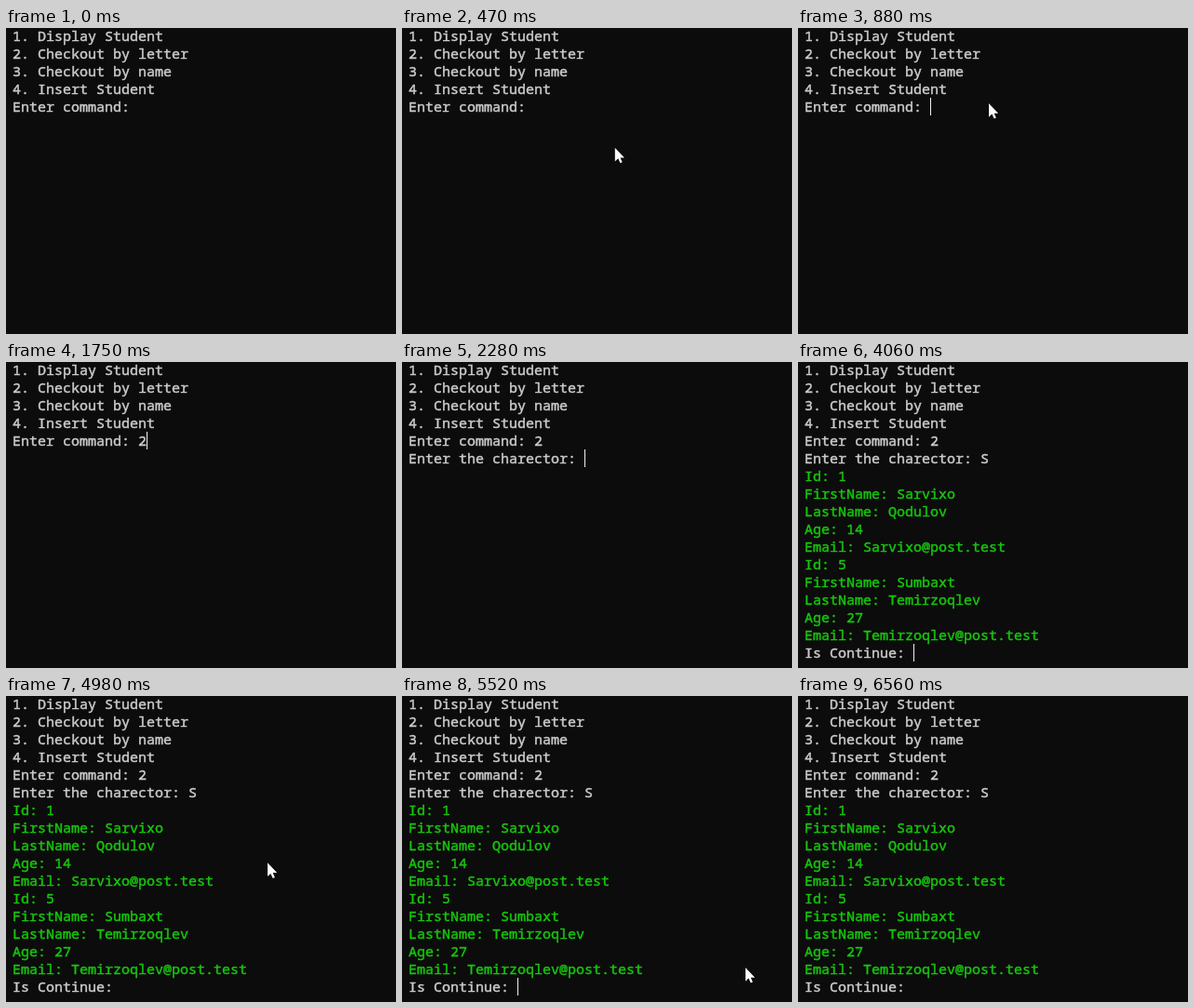
Animation of 419x329 px, one loop 6.62 s. Source, as an HTML page:

```html
<!DOCTYPE html>
<html lang="en">
<head>
<meta charset="utf-8">
<title>Student console</title>
<style>
  html, body { margin: 0; width: 100%; height: 100%; overflow: hidden; background: #0c0c0c; }
  svg { display: block; width: 419px; height: 329px; }
  text {
    font: 500 15px "Noto Sans Mono", "DejaVu Sans Mono", monospace;
    white-space: pre; fill: #ccc; stroke: #ccc; stroke-width: .45px;
  }
  .result { fill: #16c60c; stroke: #16c60c; }
</style>
</head>
<body>
<svg viewBox="0 0 419 329">
  <g id="screen"></g>
  <rect id="caret" width="1" height="19" fill="#f2f2f2"/>
  <path id="pointer" d="M0 0V14.7L3.4 11.6L5.7 16.6L7.9 15.6L5.7 10.7H10.2Z"
        fill="#fff" stroke="#000" paint-order="stroke"/>
</svg>
<script>
const LOOP = 6620, LEFT = 7, CELL = 9, ROW = 19;
const BLINK = 560, ENTER_LAG = 70, TICK = 67, SESSION_END = 6560;
const $ = id => document.getElementById(id);
const show = (el, on) => el.setAttribute('visibility', on ? 'visible' : 'hidden');

const menu = ['Display Student', 'Checkout by letter', 'Checkout by name', 'Insert Student']
  .map((item, i) => `${i + 1}. ${item}\n`).join('');

const students = [
  { Id: 1, FirstName: 'Sarvixo', LastName: 'Qodulov', Age: 14, Email: 'Sarvixo@post.test' },
  { Id: 5, FirstName: 'Sumbaxt', LastName: 'Temirzoqlev', Age: 27, Email: 'Temirzoqlev@post.test' }
];
const results = students.flatMap(Object.entries).map(([key, value]) => `\n${key}: ${value}`).join('');

// Console output in order; every key press restarts the caret blink.
const cues = [
  { at: 0, text: menu + 'Enter command: ', lag: 780 },
  { at: 1750, text: '2' },
  { at: 2210, text: '\nEnter the charector: ', lag: ENTER_LAG },
  { at: 3140, text: '' },
  { at: 3400, text: 'S' },
  { at: 3990, text: results, cls: 'result' },
  { at: 3990, text: '\nIs Continue: ', lag: ENTER_LAG }
];

const easeOut = p => 1 - (1 - p) ** 2;
const easeIn = p => p * p;

const trips = [
  { start: 70, end: 680, until: 1750, from: [322, 316], to: [205, 81], ease: easeOut },
  { start: 4720, end: 5520, until: 5520, from: [212, 91], to: [369, 292], ease: easeOut },
  { start: 5520, end: 5940, until: 5940, from: [369, 292], to: [384, 331], ease: easeIn }
];

function addText(cue, text, row, col) {
  const el = document.createElementNS('http://www.w3.org/2000/svg', 'text');
  el.setAttribute('x', LEFT + col * CELL);
  el.setAttribute('y', row * ROW + 14);
  el.setAttribute('class', cue.cls || '');
  el.textContent = text;
  $('screen').append(el);
  cue.lines.push(el);
}

// Lay the output on the character grid and note where each cue leaves the caret.
let row = 0, col = 0;
for (const cue of cues) {
  cue.lines = [];
  cue.text.split('\n').forEach((part, i) => {
    if (i) { row++; col = 0; }
    if (part) addText(cue, part, row, col);
    col += part.length;
  });
  Object.assign(cue, { row, col });
}

function drawCaret(t) {
  const { at, lag = 0, row, col } = cues.findLast(cue => t >= cue.at);
  const age = t - at - lag;
  show($('caret'), age >= 0 && age % (2 * BLINK) < BLINK && t < SESSION_END);
  $('caret').setAttribute('x', LEFT + col * CELL);
  $('caret').setAttribute('y', row * ROW - 1);
}

function drawPointer(t) {
  const trip = trips.find(({ start, until }) => t >= start && t < until);
  show($('pointer'), trip);
  if (!trip) return;
  const { start, end, from, to, ease } = trip;
  const elapsed = Math.floor((t - start) / TICK) * TICK;
  const p = ease(Math.min(1, elapsed / (end - start)));
  const [x, y] = from.map((v, i) => v + (to[i] - v) * p);
  $('pointer').setAttribute('transform', `translate(${x} ${y})`);
}

const begin = performance.now();
function draw() {
  const t = (performance.now() - begin) % LOOP;
  for (const cue of cues) cue.lines.forEach(el => show(el, t >= cue.at));
  drawCaret(t);
  drawPointer(t);
  requestAnimationFrame(draw);
}
draw();
</script>
</body>
</html>
```
